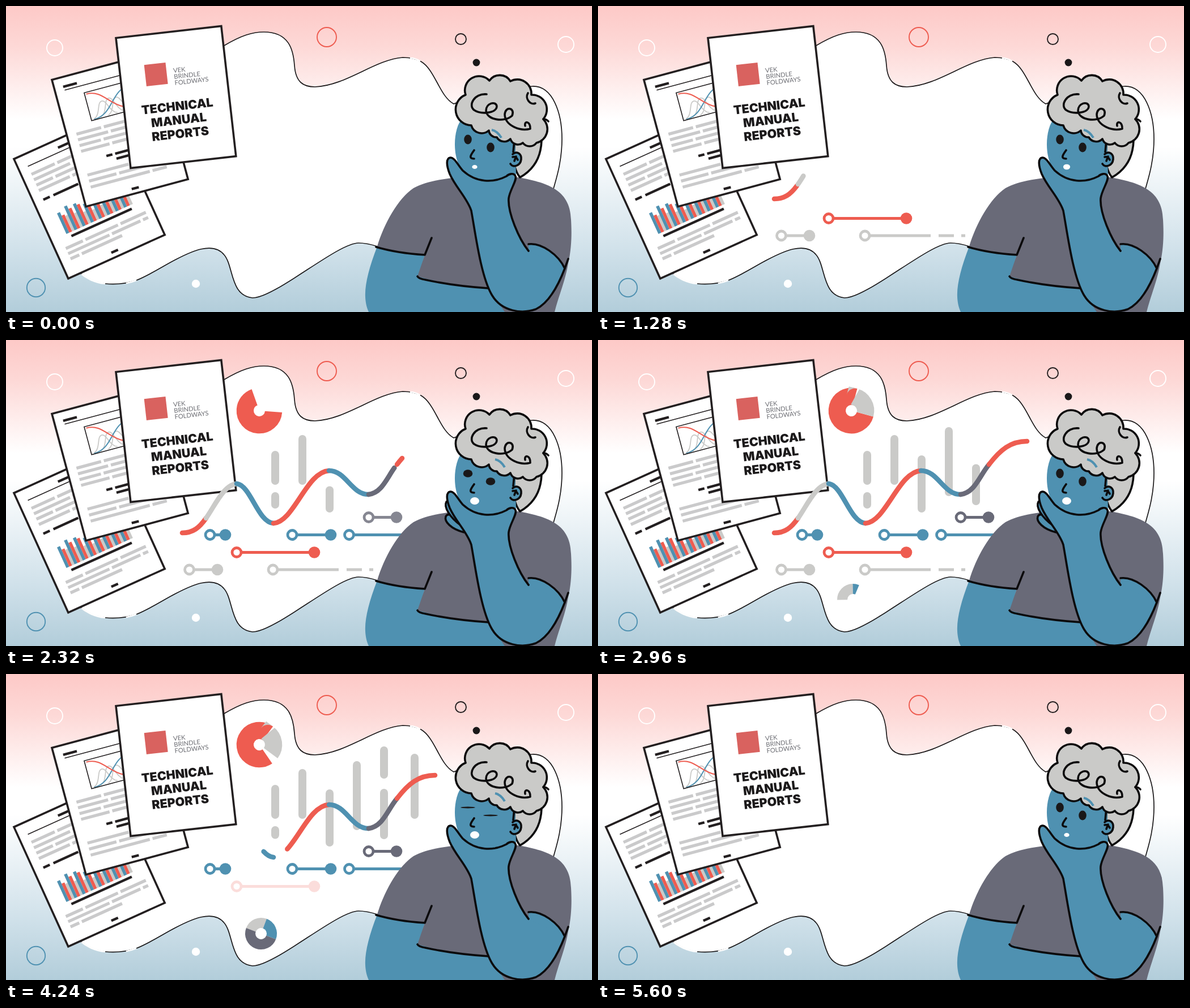
Recreate the animation shown at these times as an HTML page. Size 1034 by 541 pixels, loop 5760 ms.

```html
<!DOCTYPE html>
<html lang="en">
<head>
<meta charset="utf-8">
<title>Technical manual reports</title>
<style>
  html, body { margin: 0; width: 100%; height: 100%; overflow: hidden; }
  svg { display: block; width: 100vw; height: 100vh; }
  .ink { stroke: #0b0a0b; stroke-width: 3.6; stroke-linecap: round; stroke-linejoin: round; }
  .line { fill: none; }
  .blue { fill: #4f91b1; }
  .gray { fill: #cacac8; }
  .shirt { fill: #696a78; }
  .sheet { fill: #fff; stroke: #231f20; stroke-width: 3.6; }
  .rows { fill: none; stroke: #cacacb; stroke-width: 5.4; }
  .bold { fill: none; stroke: #231f20; stroke-width: 4.4; }
  .thin { fill: none; stroke: #231f20; stroke-width: 1.6; }
  .title { font: 900 21.4px Inter, sans-serif; fill: #1c1a1b; text-anchor: middle; }
  .brand { font: 400 11.2px Lato, sans-serif; fill: #6b6c72; }
</style>
</head>
<body>
<svg viewBox="0 0 1034 541" preserveAspectRatio="none">
  <defs>
    <linearGradient id="sky" x2="0" y2="1">
      <stop offset="0" stop-color="#fdc9c7"/>
      <stop offset=".13" stop-color="#fdd8d6"/>
      <stop offset=".37" stop-color="#fff"/>
      <stop offset=".46" stop-color="#fff"/>
      <stop offset=".8" stop-color="#d0e1ea"/>
      <stop offset="1" stop-color="#b2cdda"/>
    </linearGradient>
  </defs>
  <rect width="1034" height="541" fill="url(#sky)"/>

  <!-- cloud -->
  <path fill="#fff" stroke="#1a1819" stroke-width="1.7" d="M385 70C415 52 435 46 455 46C500 46 507 78 509 105C511 135 525 143 545 143C600 141 650 95 700 91C712 91 722 92 732 98C757 112 765 160 790 173L850 150L928 142C965 140 981 190 981 235C981 275 971 305 966 323L940 400L655 425C640 420 630 419 622 419C585 419 475 516 435 516C395 512 402 460 385 440C365 415 325 435 300 448C280 458 255 475 230 485C212 491 195 493 175 491C155 489 140 480 133 474L200 150Z"/>
  <path class="line" stroke="#fff" stroke-width="2.6" d="M713 92Q722 92 731 97.500M230 485Q221 488.500 212 490.300M175 491C155 489 140 480 133 474"/>
  <g class="line" stroke-width="1.9">
    <circle cx="86" cy="74" r="14" stroke="#fff"/>
    <circle cx="988" cy="68" r="14" stroke="#fff"/>
    <circle cx="566" cy="55" r="17" stroke="#ee5c50"/>
    <circle cx="802.500" cy="58.500" r="9.500" stroke="#231f20"/>
    <circle cx="53" cy="498" r="16.200" stroke="#4f91b1"/>
  </g>
  <circle cx="830" cy="100" r="6.400" fill="#1a1819"/>
  <circle cx="335" cy="491" r="7.200" fill="#fff"/>

  <!-- papers -->
  <g transform="translate(14 270.500) rotate(-24.400)">
    <path class="sheet" d="M0 0h187v232h-187z"/>
    <path class="thin" d="M17 22h153"/>
    <path class="bold" d="M79 14h24M17.500 87h12.500M37 87h48M88 222h13"/>
    <path class="rows" d="M17 37.500h45m5 0h100M17 48h70m5 0h75M17 58.500h32m5 0h113M17 69h60m5 0h85M18 182h33m5 0h63m5 0h49M18 192h80m5 0h55m5 0h10M18 202h17m5 0h78"/>
    <g id="bars"></g>
    <path class="bold" stroke-width="3" d="M36 166h117"/>
  </g>
  <g transform="translate(81 130.500) rotate(-15)">
    <path class="sheet" d="M0 0h186.500v232h-186.500z"/>
    <path class="thin" d="M17 23.500h153"/>
    <path class="bold" d="M16 17h25M58 155h11m5 0h40M74 164h40M86 223h13"/>
    <path class="rows" d="M17 104h45m5 0h103M17 114.500h55m5 0h93M17 125h39m5 0h109M17 135.500h52m5 0h96M17 179h75m5 0h73M17 190h50m5 0h98M17 201h108m5 0h26"/>
    <path class="line" stroke="#cacac8" stroke-width="1.800" d="M54 86C67 82 66 59 75 59S84 82 97 86M66 86C80 82 79 57 88 57S97 82 110 86M80 86C93 82 92 59 101 59S110 82 123 86"/>
    <path class="line" stroke="#4f91b1" stroke-width="2" d="M54 87C92 86 92 45 136 42"/>
    <path class="line" stroke="#ee5c50" stroke-width="2" d="M52 40C88 40 84 80 136 86"/>
    <path class="thin" stroke-width="2" d="M49 37h92v51h-92z"/>
  </g>
  <g transform="translate(194 56.500) rotate(-6.440)">
    <path class="sheet" d="M0 0h187v231.500h-187z"/>
    <path fill="#d9625f" d="M44 53h38v38h-38z"/>
    <g class="brand">
      <text x="94" y="72.500">VEK</text>
      <text x="94" y="83.500">BRINDLE</text>
      <text x="94" y="94.500">FOLDWAYS</text>
    </g>
    <g class="title">
      <text x="94" y="139.500">TECHNICAL</text>
      <text x="94" y="164">MANUAL</text>
      <text x="94" y="188.500">REPORTS</text>
    </g>
  </g>

  <g id="data"></g>

  <!-- thinker -->
  <path class="shirt" d="M802 303C770 305 738 311 719 322C692 340 667 385 655 425Q690 437 739 440L700 541H968C975 512 986 490 992 455C999 425 998 395 997 378C996 322 950 312 905 303Z"/>
  <path class="blue" d="M655 425Q690 437 739 440L726 478Q780 494 852 499L880 541H640C628 515 634 480 655 425Z"/>
  <path class="ink line" stroke-width="3" d="M653 426Q690 437 739 440L751 410M726 478Q728 482 740 484Q790 495 851 499"/>
  <path class="gray ink" d="M945 238C944 268 930 290 907 303Q900 295 897 280L897 235Z"/>
  <path class="blue" d="M806 198C788 215 787 270 805 290C830 316 870 313 900 298L898 225Z"/>
  <path class="ink line" d="M897 237L895 258"/>
  <path class="blue ink" d="M894 262C902 255 910 262 909 271C908 282 895 287 890 279"/>
  <path class="ink line" stroke-width="2.400" d="M894 267Q900 265 903 272M900 266L897 274"/>
  <path class="gray ink" d="M821 211A28 28 0 0 1 811 157A25 25 0 0 1 853 132A22 22 0 0 1 890 133A25 25 0 0 1 927 157A26 26 0 0 1 948 200A25 25 0 0 1 936 242A15 15 0 0 1 912 242A14 14 0 0 1 890 235A15 15 0 0 1 866 232A13 13 0 0 1 852 220A19 19 0 0 1 821 211Z"/>
  <path class="ink line" d="M848 156C826 154 815 176 826 184C838 192 866 190 866 177C864 167 847 172 847 185C848 202 880 206 893 194C899 180 881 176 880 192C881 212 908 222 925 217C926 204 914 202 916 212M921 154C915 163 925 176 934 172M948 200Q954 200 957 204"/>
  <path id="brow" class="line" stroke="#4f91b1" stroke-width="4.200" d="M863 211Q873 213 880 225"/>
  <g id="eyes" fill="#1a1819">
    <ellipse cx="815" cy="236"/>
    <ellipse cx="855" cy="250"/>
  </g>
  <path class="ink line" stroke-width="3" d="M826 255C821 262 815 270 826 270"/>
  <ellipse id="mouth" cx="827" cy="284.500" fill="#fff"/>
  <g id="fingers" class="blue ink">
    <path d="M808 340C785 334 773 321 776 312C779 306 786 308 800 318"/>
    <path d="M803 328C783 314 772 295 777 286C781 282 788 290 796 302"/>
  </g>
  <path class="blue" d="M922 442V421C945 418 975 440 986 464Z"/>
  <path class="blue ink" d="M922 433C905 412 885 365 887 340C889 325 902 308 899 301C896 294 887 297 883 301C860 313 830 313 806 291C797 281 792 268 784 268C776 269 777 282 783 297C793 320 814 340 821 362C828 400 838 480 858 512C875 540 910 545 935 536C960 524 976 490 986 464"/>
  <path class="ink line" d="M992 447L986 464C975 440 945 418 922 421"/>
</svg>

<script>
const LOOP = 5760, STEP = 80;
const RED = '#ee5c50', BLUE = '#4f91b1', GRAY = '#cacac8', DARK = '#696a78';
const byId = id => document.getElementById(id);
const clamp = v => Math.max(0, Math.min(1, v));
const ramp = (t, start, length) => clamp((t - start) / length);

function add(parent, tag, attrs = {}) {
  const el = document.createElementNS('http://www.w3.org/2000/svg', tag);
  set(el, attrs);
  return parent.appendChild(el);
}

function set(el, attrs) {
  for (const key in attrs) el.setAttribute(key, attrs[key]);
}

// Shows only the part of a stroke between the fractions a and b.
function trim(el, a, b) {
  const shown = Math.max(0, b - a);
  set(el, {
    visibility: shown > 0.001 ? 'visible' : 'hidden',
    'stroke-dasharray': shown === 1 ? 'none' : `${shown} 9`,
    'stroke-dashoffset': -a
  });
}

for (let i = 0; i < 8; i++) {
  [[BLUE, 40 + 6 * Math.sin(i * 1.3)], [RED, 33 + 7 * Math.sin(i)], [GRAY, 25 + 5 * Math.cos(i)]]
    .forEach(([fill, height], k) =>
      add(byId('bars'), 'rect', { x: 29.5 + 16 * i + 5.6 * k, y: 159 - height, width: 5.6, height, fill }));
}

const data = byId('data');
const stroke = (d, color, width) => add(data, 'path', {
  d, fill: 'none', stroke: color, 'stroke-width': width, 'stroke-linecap': 'round', pathLength: 1
});

// Rows of pins: colour, y, [from, to] pairs, fade-in and fade-out starts.
const rows = [
  [GRAY, 406, [[323.5, 373], [471, 587]], 400, 3680],
  [RED, 375.5, [[407, 544]], 800, 3920],
  [BLUE, 344.5, [[360, 387], [505, 573], [605.5, 710]], 1280, 4240],
  [DARK, 313.5, [[640, 689]], 2000, 4800]
].map(([color, y, pins, start, end]) => {
  const g = add(data, 'g');
  for (const [x1, x2] of pins) {
    const open = x2 === 587;
    add(g, 'path', {
      d: `M${x1} ${y}H${x2}` + (open ? 'm14 0h27m13 0h7' : ''),
      stroke: color, 'stroke-width': 5.2
    });
    add(g, 'circle', { cx: x1, cy: y, r: 8, fill: '#fff', stroke: color, 'stroke-width': 4.8 });
    if (!open) add(g, 'circle', { cx: x2, cy: y, r: 10.3, fill: color });
  }
  return { g, start, end };
});

// Bars: x, top, bottom, draw start, wipe start.
const bars = [
  [475, 269, 298, 1360, 4100], [475, 196, 256, 1680, 4240],
  [523, 168, 256, 1960, 4450], [571, 204, 305, 2200, 4560],
  [619, 154, 276, 2440, 4740], [667, 203, 292, 2710, 4820],
  [667, 128, 185, 2980, 4900], [721, 141, 256, 3140, 5000]
].map(([x, top, bottom, start, end]) =>
  ({ el: stroke(`M${x} ${bottom - 7}V${top + 7}`, GRAY, 14), start, end }));

const wave = [
  ['M311 341C330 341 341 332 353 315', RED],
  ['M353 315C368 294 384 256 407 254', GRAY],
  ['M407 254C432 257 444 322 472 324', BLUE],
  ['M472 324C508 322 530 233 570 231', RED],
  ['M570 231C600 231 610 274 640 273', BLUE],
  ['M640 273C665 270 673 240 690 220', DARK],
  ['M690 220C710 194 728 179 757 179', RED]
].map(([d, color]) => stroke(d, color, 8.6));

// Pies are thick circle strokes, split into slices by fraction.
function pie(cx, cy, radius, hole, parts, opts) {
  const g = add(data, 'g');
  let to = 0;
  const slices = parts.map(([share, color]) => {
    const el = add(g, 'circle', {
      cx, cy, r: (radius + hole) / 2, fill: 'none', stroke: color,
      'stroke-width': radius - hole, pathLength: 1
    });
    const from = to;
    to += share;
    return { el, from, to };
  });
  return { g, cx, cy, slices, ...opts };
}

const pies = [
  pie(447, 125, 40.3, 10, [[.75, RED], [.25, GRAY]], { turn: 15, start: 1800, end: 4200 }),
  pie(450, 459, 28, 10, [[.25, GRAY], [.25, BLUE], [.5, DARK]], { turn: 179, start: 2720, end: 4620 })
];

function draw(t) {
  for (const { g, start, end } of rows)
    set(g, { opacity: ramp(t, start, 400) - ramp(t, end, 400) });

  for (const { el, start, end } of bars)
    trim(el, ramp(t, end, 320), ramp(t, start, 320));

  wave.forEach((el, i) =>
    trim(el, ramp(t, 3770 + 140 * i, 240), ramp(t, 1010 + 210 * i, 290)));

  for (const { g, cx, cy, slices, turn, start, end } of pies) {
    set(g, { transform: `rotate(${turn + (t - 2960) * .017} ${cx} ${cy})` });
    const a = ramp(t, end, 760), b = ramp(t, start, 760);
    for (const { el, from, to } of slices)
      trim(el, Math.max(a, from), Math.min(b, to));
  }

  const blink = Math.max(...[640, 2440, 4240].map(c => clamp(1 - Math.abs(t - c) / 160)));
  for (const eye of byId('eyes').children)
    set(eye, { rx: 6.8 + 6 * blink, ry: 8.5 - 7 * blink });

  const talk = ramp(t, 1040, 560) - ramp(t, 4880, 560);
  set(byId('mouth'), { rx: 4.6 + 3.4 * talk, ry: 3.6 + 2.9 * talk });

  const lift = ramp(t, 1640, 500) - ramp(t, 5120, 480);
  set(byId('brow'), { transform: `translate(${-6 * (1 - lift)} ${8 * (1 - lift)})` });

  const fan = ramp(t, 1640, 460) - ramp(t, 2960, 560);
  set(byId('fingers'), {
    transform: `translate(${20 * (1 - fan)} 0)`,
    visibility: fan > 0 ? 'visible' : 'hidden'
  });
}

function tick(now) {
  draw(Math.floor(now / STEP) * STEP % LOOP);
  requestAnimationFrame(tick);
}
draw(0);
requestAnimationFrame(tick);
</script>
</body>
</html>
```
